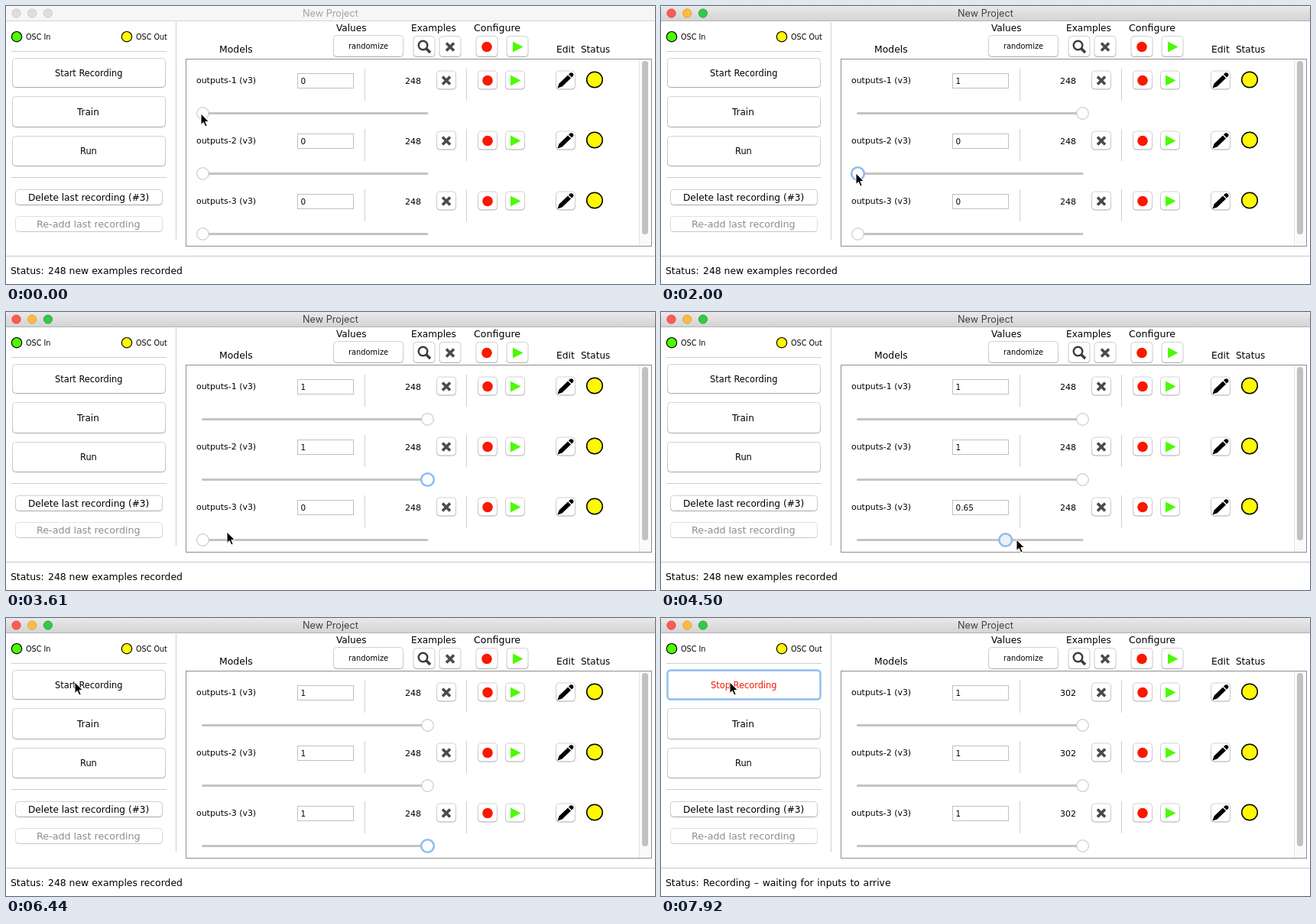
Recreate the animation shown at these times as an HTML page. Size 849x364 px, loop 8 s.

```html
<!DOCTYPE html>
<html lang="en">
<head>
<meta charset="utf-8">
<title>New Project</title>
<style>
html, body { margin: 0; width: 100%; height: 100%; overflow: hidden; background: #fff; }
svg { display: block; width: 849px; height: 364px; }
text { font-family: "DejaVu Sans", sans-serif; white-space: pre; }
.title { font-family: Inter, sans-serif; }
</style>
</head>
<body>
<svg id="stage" viewBox="0 0 849 364" xmlns="http://www.w3.org/2000/svg">
  <defs>
    <linearGradient id="bar" x2="0" y2="1">
      <stop offset="0" stop-color="#e9e9e9"/><stop offset="1" stop-color="#d3d3d3"/>
    </linearGradient>
    <linearGradient id="edge" x2="0" y2="1">
      <stop offset="0" stop-color="#d2d2d2"/><stop offset=".8" stop-color="#c6c6c6"/><stop offset="1" stop-color="#a8a8a8"/>
    </linearGradient>
  </defs>
</svg>
<script>
const stage = document.getElementById('stage');
const LOOP = 8000;
const GREEN = '#4dfa00', YELLOW = '#fffa00', RED = '#fb1700';

function set(node, attrs) {
  for (const key in attrs) node.setAttribute(key, attrs[key]);
  return node;
}
function add(tag, attrs) {
  return stage.appendChild(set(document.createElementNS('http://www.w3.org/2000/svg', tag), attrs));
}
function text(x, y, size, value, fill = '#000') {
  const node = add('text', { x, y, 'font-size': size, fill });
  node.textContent = value;
  return node;
}
function line(x1, y1, x2, y2, stroke = '#cfcfcf', width = 1) {
  return add('line', { x1, y1, x2, y2, stroke, 'stroke-width': width });
}
function circle(cx, cy, r, fill, stroke = 'none', width = 1) {
  return add('circle', { cx, cy, r, fill, stroke, 'stroke-width': width });
}
function button(x, y, width, height, rx = 4) {
  return add('rect', { x: x + .5, y: y + .5, width: width - 1, height: height - 1, rx, fill: '#fff', stroke: 'url(#edge)' });
}

// Icons are drawn around the centre of their button.
function iconButton(cx, cy, size, draw) {
  button(cx - size / 2, cy - size / 2, size, size - 1);
  draw(cx, cy);
}
function cross(x, y) {
  const r = 5;
  add('path', {
    d: `M${x - r} ${y - r}L${x + r} ${y + r}M${x + r} ${y - r}L${x - r} ${y + r}`,
    stroke: '#4a4a4a', 'stroke-width': 3.6
  });
}
function record(x, y) { circle(x, y, 6.8, RED); }
function play(x, y) {
  add('path', { d: `M${x - 6} ${y - 7}L${x + 7.5} ${y}L${x - 6} ${y + 7}Z`, fill: GREEN });
}
function lens(x, y) {
  circle(x - 1.5, y - 2, 5.8, '#fff', '#3c3c3c', 2.4);
  line(x + 3, y + 2.5, x + 8, y + 7.5, '#3c3c3c', 3.6);
}
function pencil(x, y) {
  add('path', {
    d: 'M-10.5 10L-8.5 4L3 -7L7 -3L-4.5 8ZM4 -8L6 -10Q8 -11 10 -9Q11 -7 10 -6L8 -4Z',
    transform: `translate(${x} ${y})`, fill: '#000'
  });
}

// Title bar
const bar = add('path', { d: 'M0 20V4Q0 0 4 0H845Q849 0 849 4V20Z' });
const barLine = line(0, 19.5, 849, 19.5);
const title = text(388, 14, 12.7, 'New Project');
title.setAttribute('class', 'title');
const lights = [['#fc5b57', '#df4744'], ['#fdbc40', '#dea034'], ['#34c84a', '#27aa35']]
  .map((colors, i) => ({ colors, node: circle(13.5 + i * 20.7, 9.5, 5.6, '#ddd') }));

// Left panel
circle(14, 40.2, 6.7, GREEN, '#000', 1.2);
text(26, 44, 9.6, 'OSC In');
const oscOut = circle(158, 40.2, 6.7, YELLOW, '#000', 1.2);
text(170, 44, 9.6, 'OSC Out');
line(7, 59.5, 210, 59.5);
const mainButton = button(8, 68, 201, 39);
const mainLabel = text(64, 92, 11.4, '');
button(8, 118, 201, 41);
text(93, 143, 12, 'Train');
button(8, 170, 201, 40);
text(97, 194, 11.4, 'Run');
line(7, 224.5, 210, 224.5);
button(12, 240, 193, 21);
text(29, 255, 12.15, 'Delete last recording (#3)');
set(button(12, 275, 193, 21), { opacity: .65 });
text(40, 290, 12.7, 'Re-add last recording', '#8c8c8c');
line(222.5, 21, 222.5, 306);

// Headings
text(279, 61, 12.4, 'Models');
text(432, 33, 12.1, 'Values');
text(530, 33, 12.1, 'Examples');
text(612, 33, 12.6, 'Configure');
text(720, 61, 12.3, 'Edit');
text(752, 61, 12, 'Status');
button(428, 38, 92, 29);
text(448, 56, 9.85, 'randomize');
iconButton(547, 53.5, 29, lens);
iconButton(581, 53.5, 29, cross);
iconButton(629, 53.5, 29, record);
iconButton(669, 53.5, 29, play);

// Model list
add('rect', { x: 235.5, y: 69.5, width: 609, height: 245, fill: '#fff', stroke: '#8e8e8e' });
add('rect', { x: 828, y: 70, width: 16, height: 244, fill: '#fafafa' });
line(828.5, 70, 828.5, 314, '#e4e4e4');
add('rect', { x: 832, y: 72, width: 8, height: 227, rx: 4, fill: '#c1c1c1' });

const rows = [0, 1, 2].map(i => {
  const y = 97 + 79 * i;
  text(249, y + 4, 10.95, `outputs-${i + 1} (v3)`);
  add('rect', { x: 381.5, y: y - 8.5, width: 73, height: 19, fill: '#fff', stroke: '#c0c0c0' });
  const value = text(385.5, y + 5, 10.5, '0');
  line(469.5, y - 15, 469.5, y + 27);
  line(602.5, y - 15, 602.5, y + 27);
  const count = text(522, y + 5, 11, '248');
  iconButton(576, y + .5, 26, cross);
  iconButton(630, y + .5, 26, record);
  iconButton(666, y + .5, 26, play);
  iconButton(732, y + .5, 26, pencil);
  circle(770, y - .5, 10.3, YELLOW, '#000', 1.5);
  set(line(257.5, y + 43.5, 551, y + 43.5, '#c4c4c4', 3), { 'stroke-linecap': 'round' });
  return { value, count, thumb: circle(257.5, y + 43.5, 8, '#fff') };
});

// Status line
line(0, 327.5, 849, 327.5, '#c8c8c8');
text(6, 351, 12.4, 'Status:');
const status = text(55, 351, 12.4, '');

const cursor = add('path', {
  d: 'M0 0V14.5L3.3 11.4L5.8 17L8.2 16L5.8 10.5H10.4Z',
  fill: '#000', stroke: '#fff', 'stroke-width': 1, 'stroke-linejoin': 'round'
});

const pace = [[0, 0], [1735, 20], [4060, 46], [7920, 90], [8095, 92]];

// Pointer tip: [step, x, y]
const path = [
  [4, 255, 141], [5, 272, 141], [7, 405, 141], [9, 525, 143], [12, 564, 153], [13, 578, 157],
  [15, 520, 178], [17, 345, 208], [20, 255, 219],
  [25, 255, 219], [27, 295, 218], [30, 458, 213], [32, 555, 217], [35, 593, 232],
  [37, 540, 248], [41, 289, 288], [44, 255, 299],
  [47, 255, 299], [49, 335, 299], [51, 465, 298], [53, 553, 299], [56, 590, 301],
  [64, 590, 301], [66, 500, 258], [69, 180, 62], [70, 130, 41], [73, 90, 84]
];

// For each slider: press, release and the step where focus moves on.
const drags = [[4, 12, 23], [23, 34, 46], [46, 55, 77]];
const sending = [[8, 19], [30, 40], [52, 63]];

function secant(keys, i, col) {
  const a = keys[i], b = keys[i + 1];
  return a && b ? (b[col] - a[col]) / (b[0] - a[0]) : 0;
}
function slope(keys, i, col) {
  const p = secant(keys, i - 1, col), q = secant(keys, i, col);
  return p * q > 0 ? 2 * p * q / (p + q) : 0;
}
function segment(keys, at) {
  const next = keys.findIndex(key => key[0] > at);
  return next < 0 ? keys.length - 2 : Math.max(0, next - 1);
}

function linear(keys, at) {
  const i = segment(keys, at);
  return keys[i][1] + secant(keys, i, 1) * (at - keys[i][0]);
}

// Monotone cubic through the keys
function smooth(keys, at, col) {
  const i = segment(keys, at), a = keys[i], b = keys[i + 1], span = b[0] - a[0];
  const u = Math.min(1, Math.max(0, (at - a[0]) / span)), v = 1 - u;
  return v * v * (1 + 2 * u) * a[col] + u * u * (1 + 2 * v) * b[col]
    + span * u * v * (v * slope(keys, i, col) - u * slope(keys, i + 1, col));
}

function drawSlider(row, step, [press, release, leave]) {
  let x = 257.5;
  if (step > press) {
    const at = Math.min(step, release) - .25;
    x = Math.min(551.5, Math.max(257.5, smooth(path, at, 1)));
  }
  const share = Math.round((x - 257.5) / 294 * 20) / 20;
  row.value.textContent = String(share);
  const focus = step >= press && step < leave;
  const held = focus && step <= release;
  set(row.thumb, {
    cx: x, r: focus ? 8.3 : 7.8, fill: held && step > press ? '#eeeff2' : '#fff',
    stroke: focus ? '#8ebcf2' : '#bdbdbd', 'stroke-width': focus ? 2.6 : 1
  });
}

function draw(ms) {
  const step = Math.floor(linear(pace, ms) + .15);

  const active = step >= 4;
  bar.setAttribute('fill', active ? 'url(#bar)' : '#f6f6f6');
  barLine.setAttribute('stroke', active ? '#b4b4b4' : '#d4d4d4');
  title.setAttribute('fill', active ? '#404040' : '#a2a2a2');
  for (const { node, colors } of lights) {
    set(node, { fill: active ? colors[0] : '#dedede', stroke: active ? colors[1] : '#cbcbcb' });
  }

  const out = sending.some(([on, off]) => step >= on && step < off);
  oscOut.setAttribute('fill', out ? GREEN : YELLOW);

  const count = 248 + Math.round(54 * Math.min(1, Math.max(0, (step - 78) / 12)));
  rows.forEach((row, i) => {
    drawSlider(row, step, drags[i]);
    row.count.textContent = count;
  });

  const focus = step >= 77, recording = step >= 78;
  set(mainButton, {
    fill: focus && !recording ? '#ececec' : '#fff',
    stroke: focus ? '#8ebcf2' : 'url(#edge)', 'stroke-width': focus ? 2.4 : 1
  });
  mainLabel.textContent = recording ? 'Stop Recording' : 'Start Recording';
  set(mainLabel, { x: recording ? 65 : 64, fill: recording ? RED : '#000' });
  status.textContent = recording ? 'Recording – waiting for inputs to arrive' : '248 new examples recorded';
  status.setAttribute('word-spacing', recording ? .8 : 0);

  const x = smooth(path, step, 1), y = smooth(path, step, 2);
  cursor.setAttribute('transform', `translate(${x.toFixed(1)} ${y.toFixed(1)})`);
}

const start = performance.now();
function tick() {
  draw((performance.now() - start) % LOOP);
  requestAnimationFrame(tick);
}
tick();
</script>
</body>
</html>
```
